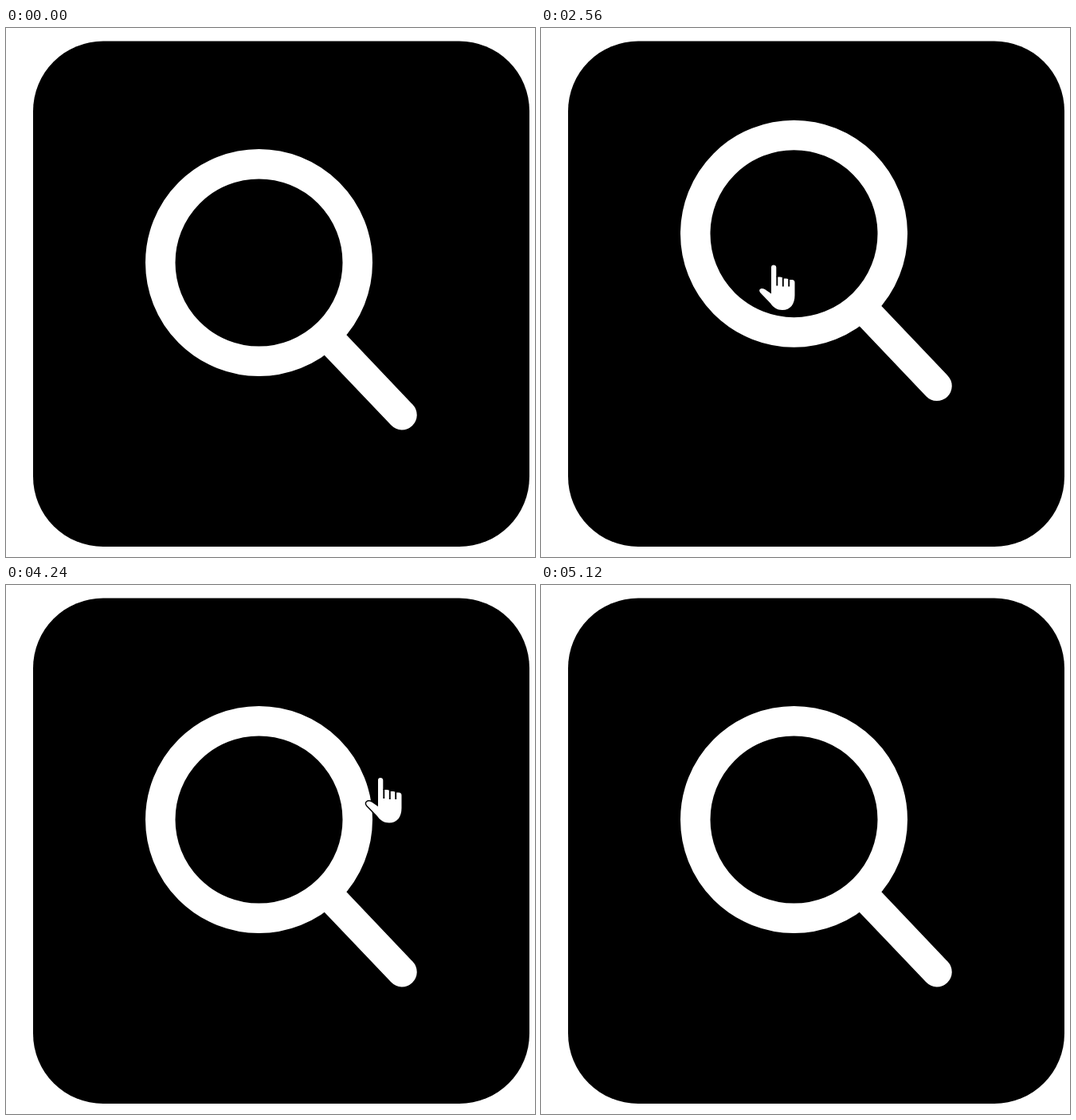
Recreate the animation shown at these times as an HTML page. Size 664 by 664 pixels, loop 6560 ms.

```html
<!DOCTYPE html>
<html lang="en">
<head>
<meta charset="utf-8">
<title>Search button hover</title>
<style>
  html, body { margin: 0; width: 100%; height: 100%; overflow: hidden; background: #fff; }
  svg { display: block; width: 100%; height: 100%; }
  .lens { fill: none; stroke: #fff; stroke-width: 37.5; stroke-linecap: round; }
  .pointer { fill: #fff; stroke-linejoin: round; visibility: hidden; }
</style>
</head>
<body>
<svg viewBox="0 0 664 664">
  <rect x="34" y="16.5" width="623" height="634.5" rx="88"/>
  <g id="lens" class="lens">
    <circle cx="317.5" cy="294.5" r="123.75"/>
    <path d="M405 389L497 485.7"/>
  </g>
  <path id="arrow" class="pointer" stroke="#444" stroke-width="2"
    d="M0 0V44L10 35L17 50L23 47L17 33H31Z"/>
  <g id="hand" class="pointer">
    <path stroke="#000" stroke-width="3" paint-order="stroke"
      d="M-3 3Q-3 0 0 0T3.300 3V15H8Q11 15 12 17H16Q18.500 17 19.500 18.500H23Q26.500 18.500 26.500 22V38C26.500 49 21 56.500 11 56.500C4 56.500 0 53.500-4 48L-16.500 35C-20 31-16 28-11 30.500L-3 36Z"/>
    <path fill="none" stroke="#000" stroke-width="1.900" d="M4.300 14V26M11.800 16V27M19.200 17.500V27"/>
  </g>
</svg>
<script>
const LOOP = 6560, STEP = 80;
const HOP = { height: 44, half: 245, starts: [2250, 4250] };

// Pointer visits: [time, x, y] of the hotspot
const visits = [
  [[2080, 658, 317], [2160, 530, 309], [2240, 415, 304], [2320, 346, 301],
   [2400, 311, 299], [2480, 298, 298], [2560, 292, 297.5], [2720, 290, 297],
   [2880, 290, 297], [2960, 302, 296], [3040, 350, 294], [3120, 455, 291], [3200, 612, 289]],
  [[4240, 470, 242], [4320, 386, 253], [4400, 341, 259.5], [4480, 333, 262],
   [4640, 342, 266], [4800, 370, 272], [4880, 383, 274], [4960, 432, 270], [5040, 550, 264]]
];

const [lens, arrow, hand] = ["lens", "arrow", "hand"].map(id => document.getElementById(id));
const smooth = x => x * x * (3 - 2 * x);

function hopAt(t) {
  const start = HOP.starts.find(s => t >= s && t < s + 2 * HOP.half);
  if (start === undefined) return 0;
  const phase = (t - start) / HOP.half;
  return -HOP.height * smooth(phase < 1 ? phase : 2 - phase);
}

function pointerAt(t) {
  const path = visits.find(v => t >= v[0][0] && t <= v[v.length - 1][0]);
  if (!path) return null;
  const next = path.findIndex(p => p[0] >= t);
  const b = path[next], a = path[Math.max(0, next - 1)];
  const k = b === a ? 0 : (t - a[0]) / (b[0] - a[0]);
  return [1, 2].map(i => a[i] + (b[i] - a[i]) * k);
}

function place(el, pos) {
  el.style.visibility = pos ? "visible" : "hidden";
  if (pos) el.setAttribute("transform", `translate(${pos})`);
}

function draw(now) {
  // Motion is sampled at 80 ms, like a screen recording
  const t = Math.floor(((now - origin) % LOOP) / STEP) * STEP;
  lens.setAttribute("transform", `translate(0 ${hopAt(t)})`);
  const pos = pointerAt(t);
  const outside = pos && pos[0] > 657;
  place(arrow, outside ? pos : null);
  place(hand, outside ? null : pos);
}

const origin = performance.now();
function frame() {
  draw(performance.now());
  requestAnimationFrame(frame);
}
frame();
</script>
</body>
</html>
```
